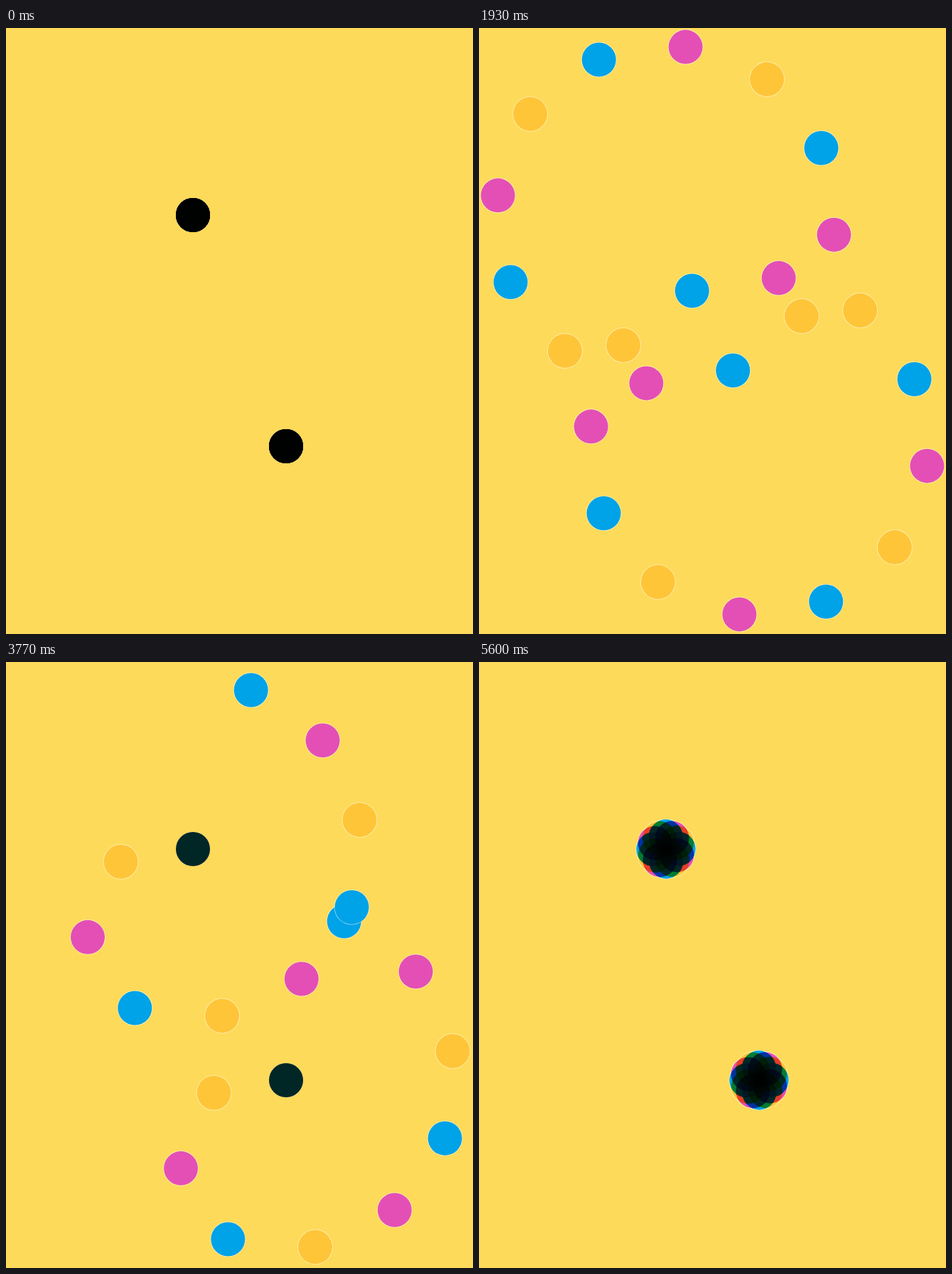
An HTML page for the animation above (5.66 s loop, 657 by 852 pixels).

```html
<!DOCTYPE html>
<html lang="en">
<head>
<meta charset="utf-8">
<title>Dots</title>
<style>
  html, body { margin: 0; width: 100%; height: 100%; overflow: hidden; background: #fdda59; }
  svg { display: block; width: 657px; height: 852px; }
  g { isolation: isolate; }
  circle { mix-blend-mode: multiply; paint-order: stroke; stroke: #fff; stroke-width: 2; }
</style>
</head>
<body>
<svg viewBox="0 0 657 852"></svg>
<script>
const LOOP = 5660;            // ms, two cycles
const CYCLE = 36;             // steps per cycle
const DOTS = 12;
const RING = 238;
const LAUNCH = [0, 103, 193, RING];   // radius in the steps after a dot leaves
const COLORS = ['#00a2e8', '#e44fb5', '#ffc539'];
const CENTERS = [[394, 588], [263, 263]];   // back to front

const svg = document.querySelector('svg');
const clamp = (v, lo, hi) => Math.min(hi, Math.max(lo, v));
const smooth = s => s * s * (3 - 2 * s);

function add(parent, name, attributes = {}) {
  const node = document.createElementNS('http://www.w3.org/2000/svg', name);
  for (const key in attributes) node.setAttribute(key, attributes[key]);
  return parent.appendChild(node);
}

const rings = CENTERS.map(([x, y]) => {
  const group = add(svg, 'g', { transform: `translate(${x} ${y})` });
  return Array.from({ length: DOTS }, (_, k) =>
    add(group, 'circle', { r: 24, fill: COLORS[k % 3] }));
});

// Steps last 80 ms, snapped to a 30 Hz clock.
function stepAt(ms) {
  const tick = Math.floor((ms % LOOP + 3.4) * 0.03);
  return Math.floor((tick + 0.5) / 2.4);
}

function draw(ms) {
  const phase = stepAt(ms) % CYCLE;
  const turn = 90 * smooth(phase / CYCLE) - 90;
  const gather = smooth(clamp((35 - phase) / 6, 0, 1));
  for (let k = 0; k < DOTS; k++) {
    const radius = LAUNCH[clamp(phase - k - 2, 0, 3)] * gather;
    const angle = (turn + 30 * k) * Math.PI / 180;
    for (const ring of rings) {
      ring[k].setAttribute('cx', radius * Math.cos(angle));
      ring[k].setAttribute('cy', radius * Math.sin(angle));
      ring[k].setAttribute('stroke-opacity', radius > 0 ? 0.45 : 0);
    }
  }
}

function tick() {
  draw(performance.now());
  requestAnimationFrame(tick);
}
tick();
</script>
</body>
</html>
```
